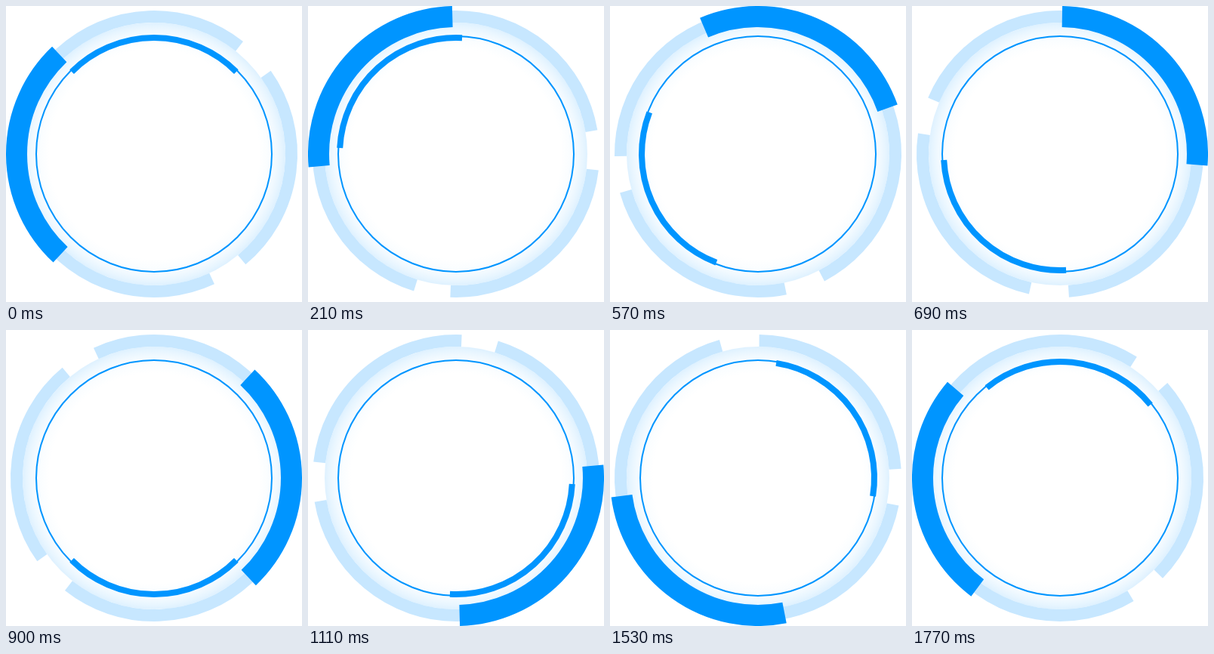
An HTML page that plays this animation: 392 by 392 pixels, repeating every 1800 ms.

```html
<!DOCTYPE html>
<html lang="en">
<head>
<meta charset="utf-8">
<title>Rotating rings</title>
<style>
  html, body { margin: 0; width: 100%; height: 100%; overflow: hidden; background: #fff; }
  svg { display: block; width: 100vw; height: 100vh; }
  path, .line { fill: none; }
</style>
</head>
<body>
<svg viewBox="0 0 392 392">
  <defs>
    <radialGradient id="glow" gradientUnits="userSpaceOnUse" cx="196" cy="196" r="174">
      <stop offset=".8" stop-color="#fff"/>
      <stop offset=".87" stop-color="#fafdff"/>
      <stop offset=".92" stop-color="#f3faff"/>
      <stop offset=".97" stop-color="#e7f5ff"/>
      <stop offset="1" stop-color="#def1ff"/>
    </radialGradient>
  </defs>
  <circle cx="196" cy="196" r="174" fill="url(#glow)"/>
  <circle class="line" cx="196" cy="196" r="156" stroke="#0095ff" stroke-width="2"/>
  <g id="outer"></g>
  <g id="inner"></g>
</svg>
<script>
const CENTER = 196, LOOP = 1800, STEP = 30;
const BLUE = '#0095ff', PALE = '#c7e7ff';
const outer = document.getElementById('outer');
const inner = document.getElementById('inner');

function point(radius, degrees) {
  const a = degrees * Math.PI / 180;
  return `${CENTER + radius * Math.cos(a)} ${CENTER + radius * Math.sin(a)}`;
}

// Adds a clockwise arc between two angles, measured from the right.
function addArc(group, radius, width, from, to, color) {
  const path = document.createElementNS('http://www.w3.org/2000/svg', 'path');
  const large = to - from > 180 ? 1 : 0;
  path.setAttribute('d', `M${point(radius, from)}A${radius} ${radius} 0 ${large} 1 ${point(radius, to)}`);
  path.setAttribute('stroke', color);
  path.setAttribute('stroke-width', width);
  group.append(path);
}

addArc(outer, 182, 16, 65.1, 308.4, PALE);
addArc(outer, 182, 16, -35.5, 50.3, PALE);
addArc(outer, 182, 28, 132.9, 226.5, BLUE);
addArc(inner, 154, 8, 225, 315, BLUE);

function rotate(group, degrees) {
  group.setAttribute('transform', `rotate(${degrees} ${CENTER} ${CENTER})`);
}

function render(time) {
  const stepped = Math.floor((time % LOOP) / STEP) * STEP;
  const turn = stepped / LOOP * 360;
  rotate(outer, turn);
  rotate(inner, -turn);
}

let start;
function tick(now) {
  start ??= now;
  render(now - start);
  requestAnimationFrame(tick);
}
render(0);
requestAnimationFrame(tick);
</script>
</body>
</html>
```
